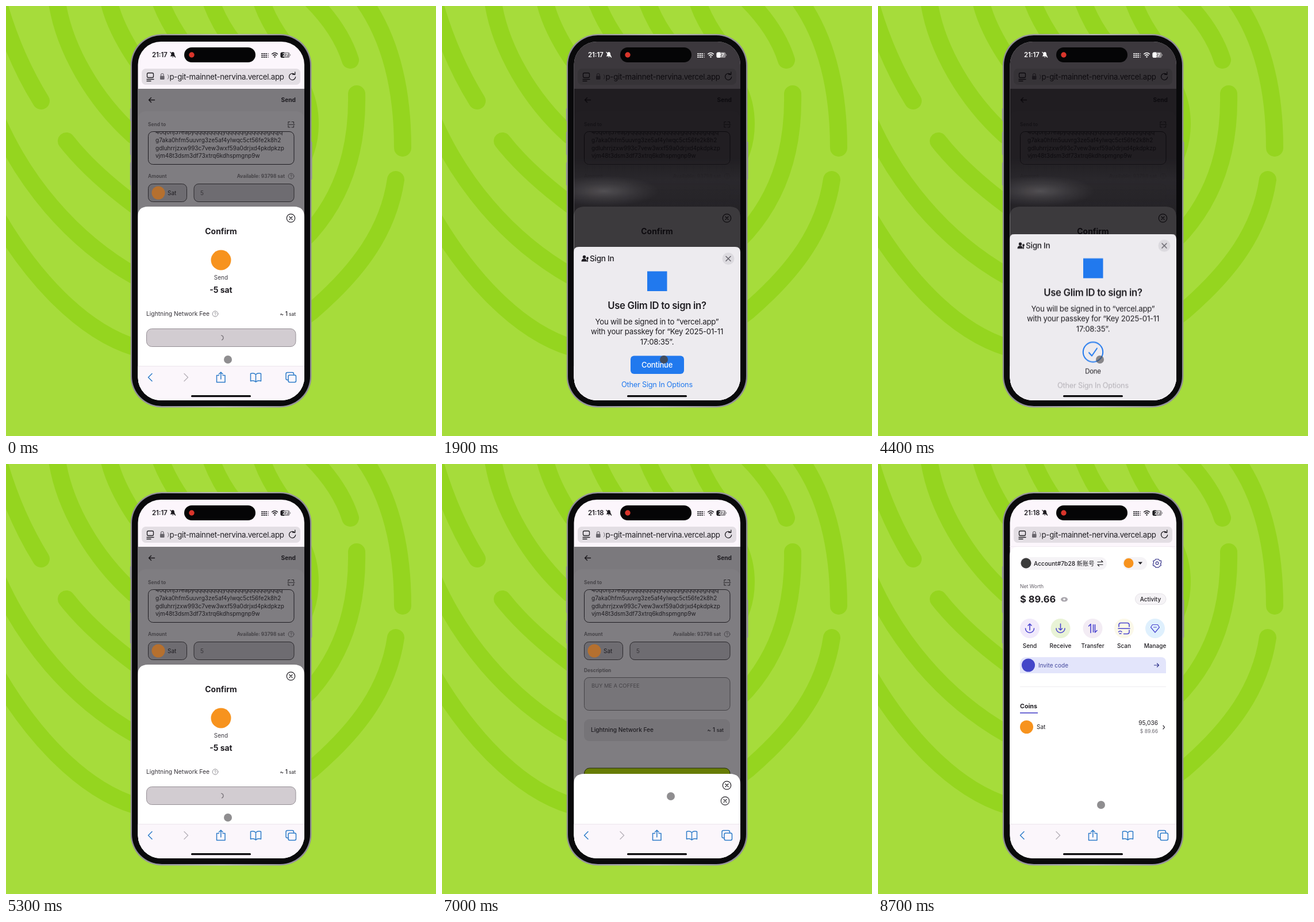
An HTML page that plays this animation: 748 by 748 pixels, repeating every 8.8 s.

```html
<!DOCTYPE html>
<html lang="en">
<head>
<meta charset="utf-8">
<title>Send flow</title>
<style>
html, body { margin: 0; width: 100%; height: 100%; overflow: hidden; background: #a6dc3b; }
svg { display: block; width: 100vw; height: 100vh; }
text { font: 400 10px Inter, 'Noto Sans CJK SC', 'Noto Sans CJK', sans-serif; fill: #1f1d22; }
.mid { text-anchor: middle; }
.end { text-anchor: end; }
.b { font-weight: 700; }
.m { font-weight: 500; }
.sys text, text.sys { letter-spacing: -.02em; }
.body text { font-size: 13.25px; }
.label text { font-size: 8.4px; fill: #474549; }
.line { fill: none; stroke-linecap: round; stroke-linejoin: round; }
.blue { stroke: #2d7cc9; stroke-width: 1.5; }
.indigo { stroke: #4a44cf; stroke-width: 1.6; }

/* Every state change is a hard cut. */
.k { animation: 8.8s step-end infinite; }
.form { animation-name: form; }
.home { animation-name: home; }
.sheet { animation-name: sheet; }
.details { animation-name: details; }
.swap { animation-name: swap; }
.ready { animation-name: ready; }
.busy { animation-name: busy; }
.spin { animation-name: spin; transform-origin: 375px 577px; }
.sign { animation-name: sign; }
.lift { animation-name: lift; }
.ask { animation-name: ask; }
.done { animation-name: done; }
.cta { animation-name: cta; }
.status { color: #1d1b20; animation-name: status; }
.touch { animation-name: touch; }
@keyframes form { 0% { opacity: 1 } 89.772%, 100% { opacity: 0 } }
@keyframes home { 0% { opacity: 0 } 89.772%, 100% { opacity: 1 } }
@keyframes sheet {
  0% { transform: none; opacity: 1 }
  79.545% { transform: translateY(190px); opacity: 1 }
  89.772%, 100% { transform: translateY(190px); opacity: 0 }
}
@keyframes details { 0% { opacity: 1 } 79.545%, 100% { opacity: 0 } }
@keyframes swap { 0% { opacity: 0 } 79.545%, 100% { opacity: 1 } }
@keyframes ready { 0% { opacity: 0 } 2.2727% { opacity: 1 } 21.5909%, 100% { opacity: 0 } }
@keyframes busy { 0% { opacity: 1 } 2.2727% { opacity: 0 } 21.5909%, 100% { opacity: 1 } }
@keyframes spin { 0% { transform: none } 69.318%, 100% { transform: rotate(140deg) } }
@keyframes sign { 0% { opacity: 0 } 21.5909% { opacity: 1 } 60.227%, 100% { opacity: 0 } }
@keyframes lift { 0% { transform: none } 40.909%, 100% { transform: translateY(-22.5px) } }
@keyframes ask { 0% { opacity: 1 } 40.909%, 100% { opacity: 0 } }
@keyframes done { 0% { opacity: 0 } 40.909%, 100% { opacity: 1 } }
@keyframes cta { 0% { fill: #2179ee } 31.818%, 100% { fill: #a9cbf3 } }
@keyframes status { 0% { color: #1d1b20 } 21.5909% { color: #fff } 60.227%, 100% { color: #1d1b20 } }
@keyframes touch {
  0% { transform: translate(386px, 615px); opacity: .6 }
  2.2727% { transform: translate(377px, 576px); opacity: .7 }
  21.5909% { transform: translate(386px, 615px); opacity: .85 }
  40.909% { transform: translate(386px, 615px); opacity: .6 }
  79.545% { transform: translate(398px, 578px); opacity: .6 }
  89.772%, 100% { transform: translate(388px, 593px); opacity: .6 }
}
</style>
</head>
<body>
<svg viewBox="0 0 748 748">
<defs>
  <clipPath id="screen"><rect x="229.5" y="62" width="289.5" height="624" rx="40"/></clipPath>
  <clipPath id="field"><rect x="248" y="219" width="253" height="56"/></clipPath>
  <linearGradient id="metal" x2="1" y2="0">
    <stop offset="0" stop-color="#8d8b92"/><stop offset=".5" stop-color="#b5b3ba"/><stop offset="1" stop-color="#8d8b92"/>
  </linearGradient>
  <linearGradient id="shade" x1="0" y1="0" x2="0" y2="1">
    <stop offset="0" stop-color="#2b292d" stop-opacity="0"/>
    <stop offset=".45" stop-color="#2b292d" stop-opacity=".9"/>
    <stop offset="1" stop-color="#252327"/>
  </linearGradient>
  <radialGradient id="glow">
    <stop offset="0" stop-color="#69676a" stop-opacity=".65"/><stop offset="1" stop-color="#555357" stop-opacity="0"/>
  </radialGradient>
  <g id="close" class="line" stroke="#1f1d22" stroke-width="1.2">
    <circle r="7.2"/><path d="M-2.5-2.5 2.5 2.5M2.5-2.5-2.5 2.5"/>
  </g>
  <g id="help" class="line" stroke="currentColor" stroke-width=".8">
    <circle r="4.8"/><path d="M-1.4-1.2C-1.4-3 1.5-3 1.5-1.2 1.5 0 0 0 0 1.2M0 2.6v.2"/>
  </g>
</defs>

<rect width="748" height="748" fill="#a6dc3b"/>
<g class="line" stroke="#95d51f" stroke-width="30">
  <path d="M-10 5Q16 92 61 165"/>
  <path d="M88-12C100 75 155 165 222 225"/>
  <path d="M178-12Q188 35 226 92"/>
  <path d="M267-12Q280 24 305 60"/>
  <path d="M355-12Q370 30 395 62"/>
  <path d="M443-12Q455 25 482 62"/>
  <path d="M530-12Q582 40 599 94"/>
  <path d="M620-12C672 60 690 150 690 247"/>
  <path d="M105 235C138 277 178 312 225 347"/>
  <path d="M-15 200C30 302 110 405 225 470C340 520 470 460 531 392C585 330 612 250 610 153"/>
  <path d="M-15 368C45 470 130 565 225 594C350 625 460 590 531 532C615 460 665 390 678 302"/>
  <path d="M514 140C534 180 534 230 514 270"/>
</g>

<g fill="#97959c">
  <rect x="215.8" y="178" width="3" height="22" rx="1"/>
  <rect x="215.8" y="219" width="3" height="40" rx="1"/>
  <rect x="215.8" y="272" width="3" height="40" rx="1"/>
  <rect x="529.5" y="236" width="3" height="66" rx="1"/>
</g>
<rect x="216.8" y="48.8" width="314.6" height="649.6" rx="54" fill="url(#metal)"/>
<rect x="219" y="51" width="310" height="645" rx="52" fill="#09090b"/>

<g clip-path="url(#screen)">
  <rect x="229" y="62" width="290" height="624" fill="#fcf6fc"/>

  <!-- address bar -->
  <rect x="236" y="109" width="276" height="28" rx="7" fill="#e3dee4"/>
  <g class="line" stroke="#1f1d22" stroke-width="1.3">
    <rect x="245.5" y="116.5" width="11" height="8" rx="2"/>
    <path d="M245 127.5h12M245 130.5h7"/>
    <path d="M502.5 119.5a5.6 5.6 0 1 0 1.2 3.8M498.5 119h4.3v-4"/>
  </g>
  <path d="M269.5 122v-2.2a2.3 2.3 0 0 1 4.6 0v2.2" class="line" stroke="#68656c" stroke-width="1.2"/>
  <rect x="268" y="121.5" width="7.6" height="6.5" rx="1.3" fill="#68656c"/>
  <path d="M281.5 119.5Q284.5 123 281.5 127" class="line" stroke="#69666c"/>
  <text x="284.5" y="128" class="sys" style="font-size:13.25px">p-git-mainnet-nervina.vercel.app</text>

  <!-- dimmed form -->
  <g class="k form">
    <rect x="229" y="144" width="290" height="483" fill="#7b797d"/>
    <path d="M229 627V199q0-16 16-16H503q16 0 16 16V627z" fill="#7f7d81"/>
    <path d="M258.5 163.5h-10m4-4-4 4 4 4" class="line" stroke="#18161a" stroke-width="1.4"/>
    <text x="504" y="166.5" class="b end" style="font-size:10.2px">Send</text>
    <g class="label">
      <text x="247" y="209" class="b">Send to</text>
      <text x="247" y="299" class="b">Amount</text>
      <text x="485" y="299" class="b end">Available: 93798 sat</text>
      <text x="247" y="362" class="b">Description</text>
    </g>
    <path d="M491 204.5v-3h3M497 201.5h3.5v3M500.5 208v3h-3.5M494 211h-3v-3M490 206.3h12" class="line" stroke="#2b292d" stroke-width="1.1"/>
    <rect x="247.5" y="218.5" width="253.5" height="57" rx="8" fill="none" stroke="#1f1d22"/>
    <g clip-path="url(#field)">
      <text x="260" y="223">40q0nj37eapyqqqqqqqqyqqqqqlgqqqqqlgqqjq</text>
      <text x="260" y="237">g7aka0hfm5uuvrg3ze5af4ylwqc5ct56fe2k8h2</text>
      <text x="260" y="250.5">gdluhrrjzxw993c7vew3wxf59a0drjxd4pkdpkzp</text>
      <text x="260" y="264">vjm48t3dsm3df73xtrq6kdhspmgnp9w</text>
    </g>
    <g color="#39373b">
      <use href="#help" x="496" y="296"/>
      <use href="#help" x="378.5" y="462.5"/>
    </g>
    <g fill="#6e6c71" stroke="#2b292d">
      <rect x="247.5" y="309.5" width="67" height="31" rx="8"/>
      <rect x="327" y="309.5" width="174" height="31" rx="8"/>
    </g>
    <circle cx="265" cy="325" r="11.5" fill="#b5702f"/>
    <text x="281" y="328.5">Sat</text>
    <text x="338" y="328.5" style="fill:#39373b">5</text>
    <rect x="247.5" y="371.5" width="253.5" height="57" rx="8" fill="#777579" stroke="#454347"/>
    <text x="260" y="389" style="font-size:9.3px;fill:#454347">BUY ME A COFFEE</text>
    <rect x="247" y="444" width="254" height="38" rx="9" fill="#767478"/>
    <text x="259" y="466" class="m" style="font-size:10.1px">Lightning Network Fee</text>
    <text x="475" y="466" class="end m">~ 1</text>
    <text x="490" y="466" class="end m" style="font-size:8.5px">sat</text>
    <rect x="247.5" y="529" width="253.5" height="31" rx="9" fill="#677c05" stroke="#252b0c"/>
  </g>

  <!-- account overview -->
  <g class="k home">
    <path d="M229 627V160q0-16 16-16H503q16 0 16 16V627z" fill="#fff"/>
    <path d="M229 143.5H519" stroke="#ebe5ec" stroke-width=".7"/>
    <rect x="247" y="162" width="151" height="22" rx="11" fill="#f5f3f6"/>
    <circle cx="257.5" cy="172.5" r="9" fill="#3b3b3b"/>
    <text x="271" y="176.5" class="m" style="font-size:10.2px">Account#7b28 新账号</text>
    <path d="M382 170.5h9l-2.5-2.5M391 175h-9l2.5 2.5" class="line" stroke="#1f1d22" stroke-width="1.2"/>
    <rect x="426" y="162" width="42" height="22" rx="11" fill="#f5f3f6"/>
    <circle cx="436" cy="172.5" r="8.5" fill="#f7931e"/>
    <path d="M452.5 170.5h7.5l-3.7 4.2z" fill="#1f1d22"/>
    <g class="line" stroke="#38368c" stroke-width="1.2">
      <path d="M483 165.5h5l1.5 2.7h3v4.3l-1.3 1 1.3 2.5-3 2.3-1.5 1.5h-5l-1.5-2.2-3-1 .2-3.6 1-1.5-1-3 2.8-.7z"/>
      <circle cx="485.5" cy="172.5" r="2.3"/>
    </g>
    <text x="247" y="216" style="font-size:8.6px;fill:#605d65">Net Worth</text>
    <text x="247" y="240.5" class="b" style="font-size:16.5px">$ 89.66</text>
    <ellipse cx="324" cy="235.5" rx="6" ry="4" fill="#aaa7ae"/><circle cx="324" cy="235.5" r="1.8" fill="#fff"/>
    <rect x="447.5" y="225.5" width="53.5" height="19" rx="9.5" fill="#f5f3f6" stroke="#e6e3e8"/>
    <text x="474" y="238.5" class="mid m">Activity</text>
    <circle cx="264" cy="286" r="17" fill="#f1eafb"/>
    <circle cx="317.5" cy="286" r="17" fill="#e9f3d6"/>
    <circle cx="373.5" cy="286" r="17" fill="#f3ecf4"/>
    <circle cx="428" cy="286" r="17" fill="#fbf8e9"/>
    <circle cx="482" cy="286" r="17" fill="#dff0fd"/>
    <g class="line indigo">
      <path d="M256.5 286a7.5 7.5 0 0 0 15 0M264 289v-11m-3 3 3-3 3 3"/>
      <path d="M310 286a7.5 7.5 0 0 0 15 0M317.5 278v11m-3-3 3 3 3-3"/>
      <path d="M366.5 282l3.5-3.5v15M374.5 279.5v13M377.5 279.5v13.5l3.5-3.5"/>
      <path d="M419 283v-3q0-3.5 3.5-3.5h11q3.5 0 3.5 3.5v3M418 286.3h20M437 289v3q0 3.5-3.5 3.5h-6M418.5 292q3-3 5.5 0M420 295h3"/>
      <path d="M477.5 279.5h9l3 4.5-7.5 9-7.5-9zM479.5 284h5" stroke-width="1.2"/>
    </g>
    <text x="264" y="320" class="mid m">Send</text>
    <text x="317.5" y="320" class="mid m">Receive</text>
    <text x="373.5" y="320" class="mid m">Transfer</text>
    <text x="428" y="320" class="mid m">Scan</text>
    <text x="482" y="320" class="mid m">Manage</text>
    <path d="M247 364v-16q0-12 12-12H492q9 0 9 9V364z" fill="#e3e5fb"/>
    <circle cx="261.5" cy="350" r="11.5" fill="#4447c9"/>
    <text x="279" y="353.5" style="fill:#43479c">Invite code</text>
    <path d="M480.5 350h8m-3-3 3 3-3 3" class="line" stroke="#34388e" stroke-width="1.2"/>
    <path d="M247 387.5H501" stroke="#eeecf0"/>
    <text x="247" y="425" class="b" style="font-size:10.7px">Coins</text>
    <path d="M247 433H278" stroke="#5c56cf" stroke-width="1.8"/>
    <circle cx="258.5" cy="457.5" r="11.5" fill="#f7931e"/>
    <text x="276" y="461">Sat</text>
    <text x="487" y="454" class="end" style="font-size:10.2px">95,036</text>
    <text x="487" y="467.5" class="end" style="font-size:8.6px;fill:#6b6870">$ 89.66</text>
    <path d="M496 455l2.5 3-2.5 3" class="line" stroke="#39363d" stroke-width="1.2"/>
  </g>

  <!-- confirm sheet -->
  <g class="k sheet">
    <path d="M229 690V367q0-18 18-18H501q18 0 18 18V690z" fill="#fff"/>
    <use href="#close" x="495.5" y="369"/>
    <g class="k details">
      <text x="374" y="396.5" class="mid b" style="font-size:13.9px">Confirm</text>
      <circle cx="374" cy="442" r="17.5" fill="#f7931e"/>
      <text x="374" y="475.5" class="mid" style="fill:#3d3a41">Send</text>
      <text x="374" y="498.5" class="mid b" style="font-size:13.9px">-5 sat</text>
      <text x="244" y="539" style="font-size:10.3px;fill:#343137">Lightning Network Fee</text>
      <use href="#help" x="364" y="535.5" color="#77747c"/>
      <text x="490" y="539" class="end m">~ 1</text>
      <text x="504" y="539" class="end" style="font-size:8.5px">sat</text>
      <g class="k busy">
        <rect x="244.5" y="561.5" width="259.5" height="31" rx="9" fill="#d2ccd1" stroke="#958f95"/>
        <path d="M374.5 573a4.2 4.2 0 0 1 1 8" class="k spin line" stroke="#716c72" stroke-width="1.2"/>
      </g>
      <g class="k ready">
        <rect x="244.5" y="562.5" width="259.5" height="31" rx="9" opacity=".15"/>
        <rect x="244.5" y="561" width="259.5" height="31" rx="9" fill="#cffd12" stroke="#39432a"/>
        <text x="374" y="579.5" class="mid b" style="font-size:9.8px">Confirm</text>
      </g>
    </g>
    <use href="#close" x="492.5" y="396" class="k swap"/>
  </g>

  <!-- browser toolbar -->
  <rect x="229" y="627" width="290" height="60" fill="#fbf6fb"/>
  <path d="M229 626.5H519" stroke="#e6e0e7" stroke-width=".8"/>
  <g class="line blue">
    <path d="M254 639.5l-6.5 6.5 6.5 6.5"/>
    <path d="M310 639.5l6.5 6.5-6.5 6.5" stroke="#b9b5bc"/>
    <path d="M370.5 642.5h-4v12h14.5v-12h-4M373.8 649v-12m-3.3 3.2 3.3-3.2 3.3 3.2"/>
    <path d="M434.5 641q-4-3.5-9-1.5v13q5-2 9 1.5 4-3.5 9-1.5v-13q-5-2-9 1.5zv13"/>
    <rect x="491" y="642" width="13.5" height="12.5" rx="2.5"/>
    <path d="M491 650.5h-1.5q-2.5 0-2.5-2.5v-8q0-2.5 2.5-2.5h8.5q2.5 0 2.5 2.5v2"/>
  </g>

  <!-- sign-in prompt -->
  <g class="k sign">
    <rect x="229" y="62" width="290" height="624" fill="#08060a" opacity=".79"/>
    <rect x="229" y="265" width="290" height="84" fill="url(#shade)"/>
    <path d="M229 349H519V367q0-18-18-18H247q-18 0-18 18z" fill="#252327"/>
    <ellipse cx="282" cy="322" rx="95" ry="27" fill="url(#glow)"/>
    <g class="k lift sys">
      <path d="M229 720V428q0-9 9-9H510q9 0 9 9V720z" fill="#edebef"/>
      <g fill="#1f1d22">
        <circle cx="247.5" cy="436.5" r="2.7"/>
        <path d="M242.5 444.5q0-5 5-5 4 0 4.5 5z"/>
        <circle cx="253" cy="438.5" r="1.9"/><path d="M252.2 440h1.6v5h-1.6z"/>
      </g>
      <text x="257" y="444" class="m" style="font-size:13.6px">Sign In</text>
      <circle cx="498" cy="439.5" r="10.5" fill="#dcdadf"/>
      <path d="M494 435.5l8 8m0-8-8 8" class="line" stroke="#66636b" stroke-width="1.5"/>
      <rect x="357" y="461.5" width="34.5" height="34.5" fill="#2179ee"/>
      <text x="374" y="526.5" class="mid" style="font-size:16.7px;font-weight:600">Use Glim ID to sign in?</text>
      <g class="body">
        <text x="374" y="554" class="mid">You will be signed in to “vercel.app”</text>
        <text x="374" y="571.3" class="mid">with your passkey for “Key 2025-01-11</text>
        <text x="374" y="588.5" class="mid">17:08:35”.</text>
      </g>
      <g class="k ask">
        <rect x="328" y="608.5" width="93" height="31.5" rx="6" class="k cta"/>
        <text x="374" y="629" class="mid m" style="font-size:13px;fill:#fff">Continue</text>
        <text x="374" y="662.5" class="mid" style="font-size:12.8px;fill:#2179ee">Other Sign In Options</text>
      </g>
      <g class="k done">
        <g class="line" stroke="#2179ee" stroke-width="2">
          <circle cx="374" cy="624.5" r="17.2"/>
          <path d="M367 625.5l5 5.5 9-13"/>
        </g>
        <text x="374" y="661.5" class="mid" style="font-size:11.4px">Done</text>
        <text x="374" y="687" class="mid" style="font-size:12.8px;fill:#b5b2b8">Other Sign In Options</text>
      </g>
    </g>
  </g>

  <!-- status bar -->
  <g class="k status" fill="currentColor">
    <g class="clock">
      <text x="254" y="89" class="k details" style="font-size:11.3px;font-weight:600;fill:currentColor">21:17</text>
      <text x="254" y="89" class="k swap" style="font-size:11.3px;font-weight:600;fill:currentColor">21:18</text>
    </g>
    <path d="M285.5 87.5q2-1.5 2-4 0-3.5 2.7-3.5t2.7 3.5q0 2.5 2 4zM288.7 88.5h3q-1.5 2-3 0z"/>
    <path d="M285.5 80l9.5 9.5" stroke="currentColor" stroke-width="1.1"/>
    <g stroke="currentColor" stroke-width="2.2" stroke-dasharray="2 1">
      <path d="M445.5 82v8M449 82v8M452.5 82v8"/><path d="M456 82v8" opacity=".4"/>
    </g>
    <g class="line" stroke="currentColor" stroke-width="1.6">
      <path d="M462.7 83.5q4.8-4 9.6 0M464.7 86q2.8-2.3 5.6 0"/><circle cx="467.5" cy="88.5" r=".5"/>
    </g>
    <rect x="477.5" y="80.5" width="16" height="9.5" rx="2.8" opacity=".45"/>
    <path d="M480.3 80.5h3.7v9.5h-3.7q-2.8 0-2.8-2.8v-3.9q0-2.8 2.8-2.8zM494.5 83.5q1.5 1.7 0 3.5z"/>
    <text x="485.7" y="88.3" class="mid b" style="font-size:8px;fill:#fff">27</text>
  </g>
  <rect x="310" y="72" width="124" height="26" rx="13" fill="#050506"/>
  <circle cx="323" cy="85" r="4.7" fill="#d9352b"/>
  <rect x="322" y="677" width="104" height="3.3" rx="1.6" fill="#0b0a0c"/>
  <circle r="7" fill="#464447" class="k touch"/>
</g>
</svg>
</body>
</html>
```
